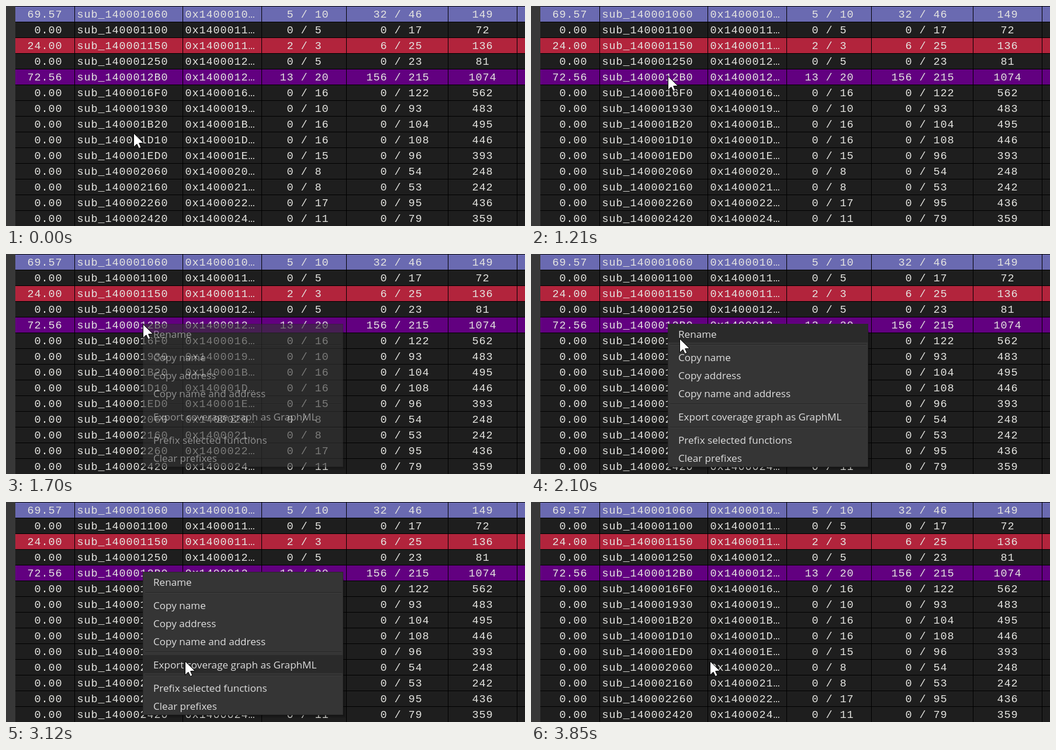
Recreate the animation shown at these times as an HTML page. Size 888 by 378 pixels, loop 4.92 s.

```html
<!DOCTYPE html>
<html lang="en">
<head>
<meta charset="utf-8">
<title>Context menu</title>
<style>
  html, body { margin: 0; width: 100%; height: 100%; overflow: hidden; background: #1e1e1e; }
  svg { display: block; width: 888px; height: 378px; }
  #table text { font: 18.5px "Liberation Mono", "Courier New", monospace; letter-spacing: .9px; fill: #e4e4e0; }
  #menu text { font: 17.1px "Open Sans", "Noto Sans", sans-serif; fill: #dedede; }
  .mid { text-anchor: middle; }
  .end { text-anchor: end; }
</style>
</head>
<body>
<svg viewBox="0 0 888 378">
  <g id="table"></g>
  <g id="menu">
    <g fill="#000">
      <rect x="237" y="136" width="345" height="235" opacity=".1"/>
      <rect x="236" y="134" width="344" height="235" opacity=".16"/>
      <rect x="235" y="132" width="343" height="235" opacity=".25"/>
    </g>
    <rect x="234.5" y="120.5" width="342" height="245" fill="#353535" stroke="#292929"/>
    <rect id="hover" x="235" width="341" height="31" fill="#2a2a2a"/>
  </g>
  <circle id="click" r="18" fill="#fff000" fill-opacity=".55"/>
  <path id="cursor" d="M.5 .7V24.3L5.9 19.2L9.4 26.5L13 25L9.7 17.7L17.3 17.2Z" fill="#fff" stroke="#000" stroke-linejoin="round"/>
</svg>
<script>
const LOOP = 4920;
const PITCH = 27;
const $ = id => document.getElementById(id);

function add(parent, tag, attrs, text = "") {
  const el = document.createElementNS("http://www.w3.org/2000/svg", tag);
  for (const name in attrs) el.setAttribute(name, attrs[name]);
  el.textContent = text;
  parent.append(el);
  return el;
}

// coverage, address tail, blocks, instructions, size
const rows = `69.57 1060 5/10 32/46 149
0.00 1100 0/5 0/17 72
24.00 1150 2/3 6/25 136
0.00 1250 0/5 0/23 81
72.56 12B0 13/20 156/215 1074
0.00 16F0 0/16 0/122 562
0.00 1930 0/10 0/93 483
0.00 1B20 0/16 0/104 495
0.00 1D10 0/16 0/108 446
0.00 1ED0 0/15 0/96 393
0.00 2060 0/8 0/54 248
0.00 2160 0/8 0/53 242
0.00 2260 0/17 0/95 436
0.00 2420 0/11 0/79 359`.split("\n").map(line => line.split(" "));
const tints = { 0: "#6a6ab1", 2: "#b2243c", 4: "#620080" };

function drawTable() {
  const table = $("table");
  const rect = (x, y, width, height, fill) => add(table, "rect", { x, y, width, height, fill });
  rect(0, 0, 888, 378, "#1e1e1e");
  rows.forEach(([cover, tail, blocks, instrs, size], i) => {
    const top = i * PITCH, y = top + 20;
    // half the letter spacing centres each glyph in its 12px cell
    const cell = (x, text, cls = "") => add(table, "text", { x: x + 0.45, y, class: cls }, text);
    const ratio = (x, value) => {
      const [hit, all] = value.split("/");
      cell(x, hit, "end");
      cell(x + 12, "/");
      cell(x + 36, all);
    };
    if (tints[i]) rect(16, top, 872, PITCH, tints[i]);
    rect(16, top, 872, 1, "#000");
    cell(96, cover, "end");
    cell(121, "sub_14000" + tail);
    cell(306, "0x14000" + tail.slice(0, 2) + "…");
    ratio(492, blocks);
    ratio(652, instrs);
    cell(815, size, "mid");
  });
  for (const x of [117, 302, 437, 582, 756, 874]) rect(x, 0, 1, 378, "#000");
  rect(0, 0, 16, 378, "#383838");
}

const items = [
  [122, "Rename"],
  [162, "Copy name"],
  [193, "Copy address"],
  [224, "Copy name and address"],
  [264, "Export coverage graph as GraphML"],
  [304, "Prefix selected functions"],
  [335, "Clear prefixes"]
];

function drawMenu() {
  const menu = $("menu");
  for (const y of [155, 257, 297]) {
    add(menu, "rect", { x: 238, y, width: 336, height: 1, fill: "#252525" });
    add(menu, "rect", { x: 238, y: y + 1, width: 336, height: 1, fill: "#3e3e3e" });
  }
  for (const [top, label] of items) add(menu, "text", { x: 252, y: top + 22 }, label);
}

const mix = (a, b, p) => Math.round(a + (b - a) * p);
const stepAt = (t, from, to) => Math.min(7, Math.floor((t - from) / ((to - from) / 7) + 0.01));
const easeOut = (p, power) => 1 - (1 - p) ** power;

function pointer(t) {
  if (t < 590) return [218, 218];
  if (t < 1210) {
    const p = (stepAt(t, 590, 1080) + 1) / 8, e = p * p * (3 - 2 * p);
    return [mix(218, 234, e), mix(218, 118, e)];
  }
  if (t < 2100) return [234, 120];
  if (t < 2650) {
    const e = easeOut(stepAt(t, 2100, 2580) / 7, 1.7);
    return [mix(254, 306, e), mix(145, 259, e)];
  }
  return [306, mix(263, 273, easeOut(stepAt(t, 2650, 3120) / 7, 1.8))];
}

function menuOpacity(t) {
  if (t < 1630 || t >= 3850) return 0;
  return t < 1700 ? 0.2 : t < 1770 ? 0.6 : 1;
}

function draw(t) {
  const [x, y] = pointer(t);
  const move = `translate(${x} ${y})`;
  $("cursor").setAttribute("transform", move);
  $("click").setAttribute("transform", move);
  const pressed = (t >= 1560 && t < 1630) || (t >= 3650 && t < 3850);
  $("click").setAttribute("opacity", pressed ? 1 : 0);
  $("menu").setAttribute("opacity", menuOpacity(t));

  const item = t >= 2100 && items.find(([top]) => y >= top && y < top + 31);
  $("hover").setAttribute("opacity", item ? 1 : 0);
  if (item) $("hover").setAttribute("y", item[0] - 1);
}

drawTable();
drawMenu();
const start = performance.now();
function tick() {
  draw((performance.now() - start) % LOOP);
  requestAnimationFrame(tick);
}
tick();
</script>
</body>
</html>
```
